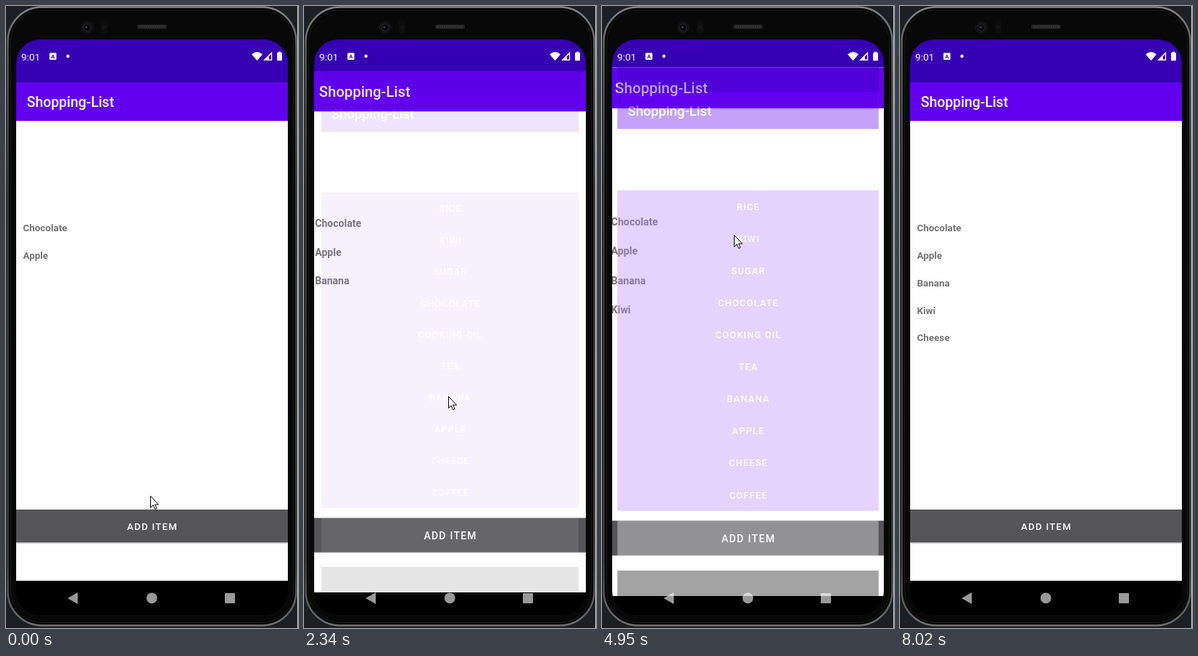
An HTML page for the animation above (8520 ms loop, 403 px wide and 856 px high).

```html
<!DOCTYPE html>
<html lang="en">
<head>
<meta charset="utf-8">
<title>Shopping list</title>
<style>
  html, body { margin: 0; width: 100%; height: 100%; overflow: hidden; background: #1c1f23; }
  body { position: relative; font-family: Roboto, sans-serif; }
  svg { position: absolute; left: 0; top: 0; display: block; }
  #screen {
    position: absolute; left: 14px; top: 46px; width: 375px; height: 792px;
    overflow: hidden; border-radius: 33px; background: #000;
  }
  .page {
    position: absolute; inset: 0;
    background: linear-gradient(#3700b3 59px, #fefefe 59px 745px, #000 745px);
  }
  .bar {
    position: absolute; top: 59px; width: 100%; height: 53px; line-height: 55px;
    text-indent: 14.7px; color: #fff; background: #6200ee;
    font-size: 19.4px; font-weight: 500; box-shadow: 0 1px 2px rgba(0, 0, 0, .22);
  }
  .item {
    position: absolute; left: 9.5px; line-height: 20px;
    font-size: 13.4px; font-weight: 700; color: #747474;
  }
  .button {
    position: absolute; width: 100%; height: 45.84px; line-height: 47.2px;
    text-align: center; color: #fff; font-size: 13.36px; font-weight: 500;
    letter-spacing: .0893em; text-indent: .0893em;
  }
  #add { top: 646.5px; background: #555456; box-shadow: 0 1px 2px rgba(0, 0, 0, .45); }
  #add.pressed { box-shadow: 0 4px 7px rgba(0, 0, 0, .36), 0 1px 2px rgba(0, 0, 0, .3); }
  #choices { position: absolute; top: 200.2px; width: 100%; height: 458.4px; background: #bb86fc; }
</style>
</head>
<body>
<svg width="403" height="856">
  <defs>
    <linearGradient id="rim" x2="0" y2="1">
      <stop offset="0" stop-color="#858585"/>
      <stop offset=".07" stop-color="#5c5c5c"/>
      <stop offset=".3" stop-color="#3a3a3a"/>
      <stop offset=".9" stop-color="#3e3e3e"/>
      <stop offset="1" stop-color="#707070"/>
    </linearGradient>
  </defs>
  <rect width="403" height="856" fill="#1c1f23"/>
  <rect x="402" width="1" height="856" fill="#c9c9c9"/>
  <rect x="2.5" y="1.5" width="398" height="851" rx="47" fill="#050505" stroke="url(#rim)" stroke-width="2.5"/>
  <rect x="6.5" y="5.5" width="390" height="843" rx="43" fill="#080809" stroke="#1b1b1d"/>
  <circle cx="112" cy="29.5" r="9" fill="#121214"/>
  <circle cx="112" cy="29.5" r="5" fill="#050507" stroke="#202025" stroke-width="1.5"/>
  <circle cx="111" cy="29" r="1.5" fill="#40434c"/>
  <rect x="131" y="19" width="9" height="20" rx="4" fill="#0e0e0f"/>
  <circle cx="135.5" cy="29" r="3" fill="#151517"/>
  <rect x="181" y="25.5" width="41" height="6" rx="3" fill="#252526"/>
  <path d="M184 28.5H220" stroke="#363637" stroke-width="3" stroke-dasharray="2 1"/>
</svg>

<div id="screen">
  <div class="page" id="list">
    <div class="bar">Shopping-List</div>
    <div class="button" id="add">ADD ITEM</div>
  </div>
  <div class="page" id="picker">
    <div class="bar">Shopping-List</div>
    <div id="choices"></div>
  </div>
</div>

<svg width="403" height="856" font-family="Roboto, sans-serif">
  <g fill="#fff">
    <text x="21" y="74.5" font-size="13.6">9:01</text>
    <rect x="60" y="64.5" width="9.5" height="9.5" rx="1"/>
    <text x="64.75" y="72" text-anchor="middle" font-size="7.5" font-weight="700" fill="#3700b3">A</text>
    <circle cx="85.5" cy="69" r="2.2"/>
    <path d="M339 66.5Q346.5 60 354 66.5L346.5 75.3Z"/>
    <path d="M367.2 62.8V75H355Z"/>
    <path d="M365.8 66.5V73.6H362.8V69.6Z" fill="#3700b3"/>
    <rect x="374" y="64" width="7" height="11.2" rx="1"/>
    <rect x="376" y="62.8" width="3" height="2"/>
  </g>
  <g fill="#fff" opacity=".6">
    <path d="M85 815L99 807V823Z"/>
    <circle cx="201.3" cy="814.8" r="7.4"/>
    <rect x="302" y="808" width="14" height="14" rx="1"/>
  </g>
  <path id="cursor" d="M.5 .5V16.4L4.2 12.9L6.7 18.5L9 17.5L6.6 12.1H11.6Z" fill="#fff" stroke="#000"/>
</svg>

<script>
const LOOP = 8520, STEP = 120, PRESS = 310, SLIDE = 400, ROW = 45.84;
const $ = id => document.getElementById(id);
const list = $('list'), picker = $('picker'), add = $('add'), cursor = $('cursor');

// Each action ends with the cursor at x, y; its page change starts after a delay.
const home = { x: 199, y: 674 };
const actions = [
  { kind: 'move',  from: 130,  to: 390,  x: 190, y: 714 },
  { kind: 'open',  from: 940,  to: 1640, x: 199, y: 535, delay: -35 },
  { kind: 'close', from: 2070, to: 2850, x: 171, y: 704, delay: 162 },
  { kind: 'open',  from: 3620, to: 4280, x: 182, y: 315, delay: -35 },
  { kind: 'close', from: 4710, to: 5610, x: 152, y: 721, delay: 175 },
  { kind: 'open',  from: 6300, to: 7240, x: 190, y: 628, delay: -35 },
  { kind: 'close', from: 7360, to: 8020, x: 186, y: 870, delay: 136 }
];

function addText(parent, className, text, top) {
  const el = document.createElement('div');
  el.className = className;
  el.textContent = text;
  el.style.top = top + 'px';
  parent.append(el);
  return el;
}
const items = ['Chocolate', 'Apple', 'Banana', 'Kiwi', 'Cheese']
  .map((name, i) => addText(list, 'item', name, 250 + 37.85 * i));
['Rice', 'Kiwi', 'Sugar', 'Chocolate', 'Cooking oil', 'Tea', 'Banana', 'Apple', 'Cheese', 'Coffee']
  .forEach((name, i) => addText($('choices'), 'button', name.toUpperCase(), ROW * i));

const clamp = v => Math.min(1, Math.max(0, v));
const mix = (a, b, p) => a + (b - a) * p;
const smooth = p => p * p * (3 - 2 * p);

// A quick rise followed by a very slow settling.
function settle(x) {
  if (x <= 0) return 0;
  if (x >= 1) return 1;
  return 1 / (1 + (.186 / x) ** 3.4);
}

function pose(action, t) {
  if (!action || action.kind === 'move') return [1, 1, 0];
  const age = t - action.from - action.delay;
  const p = settle(age / SLIDE);
  const fade = clamp((age - 33) / 50);
  return action.kind === 'open'
    ? [mix(1, 1.05, p), mix(.9, 1, p), fade]
    : [mix(1.1, 1, p), mix(1, .9, p), 1 - fade];
}

function render(now) {
  const index = actions.findLastIndex(a => now >= a.from);
  const action = actions[index];
  let t = now, { x, y } = home;
  if (action) {
    // The picture updates in hard steps while something moves.
    if (now < action.to) t = action.from + Math.floor((now - action.from) / STEP) * STEP;
    const start = actions[index - 1] || home;
    const done = (t - action.from) / (action.to - action.from);
    const p = smooth(clamp((done - .26) / .74));
    x = Math.round(mix(start.x, action.x, p));
    y = Math.round(mix(start.y, action.y, p));
  }
  const [listScale, pickerScale, alpha] = pose(action, t);
  list.style.transform = `scale(${listScale})`;
  picker.style.transform = `scale(${pickerScale})`;
  picker.style.opacity = alpha;

  const count = 2 + actions.filter(a => a.kind === 'close' && t >= a.from).length;
  items.forEach((el, i) => el.style.visibility = i < count ? 'visible' : 'hidden');
  const next = actions[index + 1];
  add.classList.toggle('pressed', next?.kind === 'open' && t >= next.from - PRESS);
  cursor.setAttribute('transform', `translate(${x} ${y})`);
}

const start = performance.now();
function loop() {
  render((performance.now() - start) % LOOP);
  requestAnimationFrame(loop);
}
loop();
</script>
</body>
</html>
```
